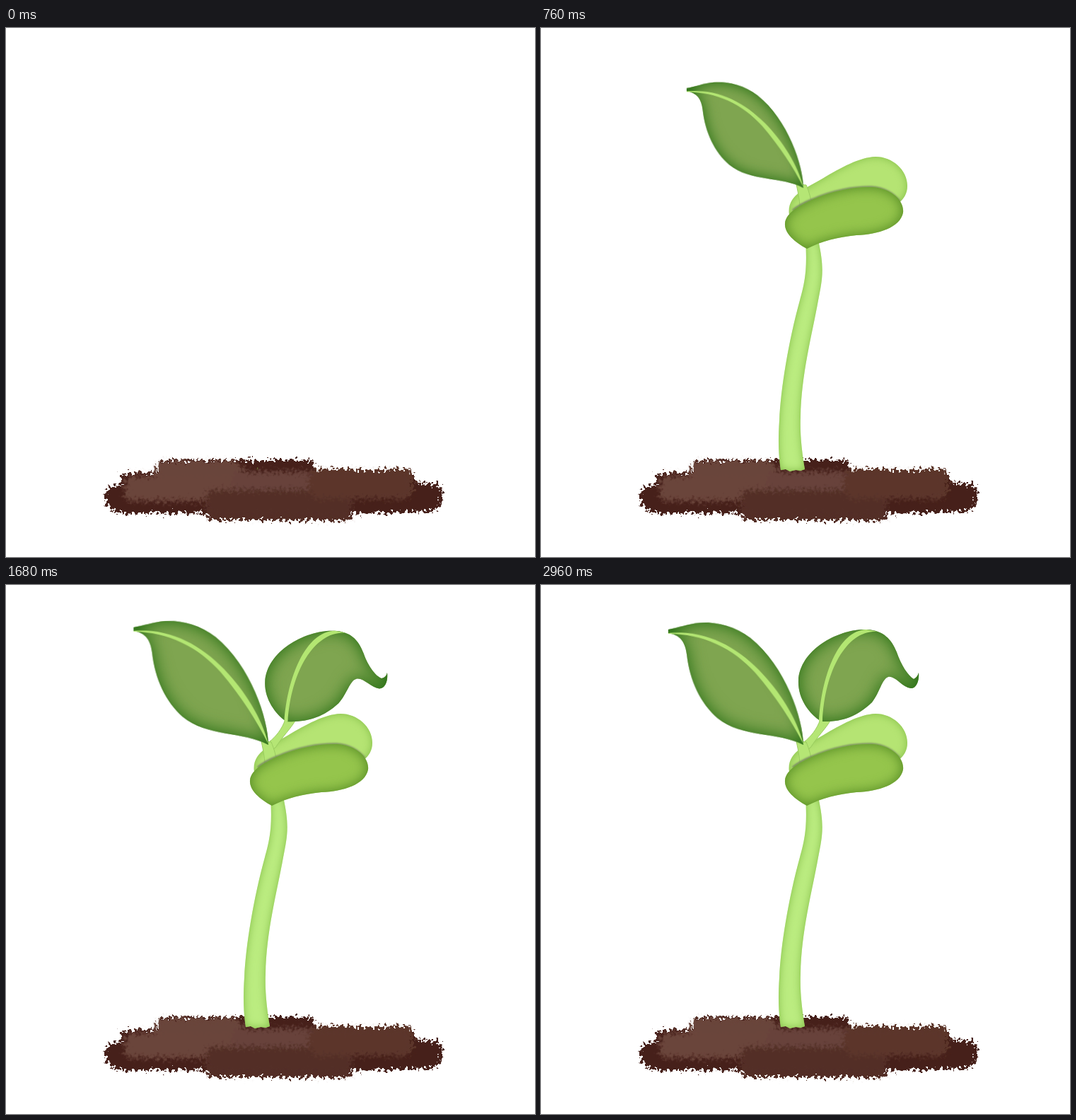
Write an HTML page without scripts that moves like this. It is 748 px wide and 748 px high and loops after 3 s.

```html
<!DOCTYPE html>
<html lang="en">
<head>
<meta charset="utf-8">
<title>Sprout</title>
<style>
html, body { margin: 0; width: 100%; height: 100%; overflow: hidden; background: #fff; }
svg { display: block; width: 100vw; height: 100vh; }

.pop { animation: 3s cubic-bezier(.333, 1.427, .667, 1) infinite; }
.sway { animation: 3s ease-in-out infinite; }

#plant { transform-origin: 355px 625px; animation-name: plant; }
#stalkL { transform-origin: 373px 252px; animation-name: stalkL; animation-timing-function: ease-out; }
#stalkR { transform-origin: 370px 238px; animation-name: stalkR; animation-timing-function: ease-out; }
#leafL { transform-origin: 371px 226px; animation-name: leafL; }
#leafR { transform-origin: 398px 193px; animation-name: leafR; }
#swayL { transform-origin: 371px 226px; animation-name: swayL; }
#bladeR { animation-name: bladeR; }
#veinR { animation-name: veinR; }

@keyframes plant { 0% { transform: scale(0); } 19.33%, 100% { transform: scale(1); } }
@keyframes stalkL { 0%, 18% { transform: scale(0); } 23.3%, 100% { transform: scale(1); } }
@keyframes stalkR { 0%, 25.3% { transform: scale(0); } 32%, 100% { transform: scale(1); } }
@keyframes leafL { 0%, 19.33% { transform: scale(0); } 38.67%, 100% { transform: scale(1); } }
@keyframes leafR { 0%, 32% { transform: scale(0); } 49.67%, 100% { transform: scale(1); } }

@keyframes swayL {
  0%, 32.33%, 63.33%, 94.33%, 100% { transform: rotate(-.4deg) skewY(-1.7deg); }
  47.83%, 78.83% { transform: rotate(0deg) skewY(0deg); }
}
@keyframes bladeR {
  0%, 32.33%, 63.33%, 94.33%, 100% {
    d: path("M396 193 C378 181 363 160 364 135 C366 91 422 61 461 63 C484 64 496 77 503 95 C509 113 519 128 527 133 C531 131 533 128 534 124 C535 133 532 146 523 146 C511 145 501 128 491 130 C482 133 479 152 468 166 C446 187 424 194 396 193Z");
  }
  47.83%, 78.83% {
    d: path("M397 193 C383 184 368 160 369 140 C371 95 428 66 468 67 C490 68 501 77 509 99 C515 116 527 130 536 131 C541 131 544 129 545 124 C547 137 542 147 534 147 C522 146 512 134 501 136 C491 138 488 153 473 169 C451 188 427 195 397 193Z");
  }
}
@keyframes veinR {
  0%, 32.33%, 63.33%, 94.33%, 100% { d: path("M393 193 C396 130 420 64 460 63 L477 66 C434 62 401 119 398 193Z"); }
  47.83%, 78.83% { d: path("M394 193 C400 132 428 67 472 67 L487 70 C442 66 406 121 399 193Z"); }
}
</style>
</head>
<body>
<svg viewBox="0 0 748 748">
  <defs>
    <!-- darker rim fading inwards -->
    <filter id="leafRim" x="-20%" y="-20%" width="140%" height="140%" color-interpolation-filters="sRGB">
      <feFlood flood-color="#37791f"/>
      <feComposite in2="SourceAlpha" operator="out"/>
      <feGaussianBlur stdDeviation="12"/>
      <feComponentTransfer><feFuncA type="linear" slope="1.35"/></feComponentTransfer>
      <feComposite in2="SourceAlpha" operator="in" result="rim"/>
      <feMerge><feMergeNode in="SourceGraphic"/><feMergeNode in="rim"/></feMerge>
    </filter>
    <filter id="seedRim" x="-20%" y="-30%" width="140%" height="160%" color-interpolation-filters="sRGB">
      <feFlood flood-color="#5f952a"/>
      <feComposite in2="SourceAlpha" operator="out"/>
      <feGaussianBlur stdDeviation="9"/>
      <feComponentTransfer><feFuncA type="linear" slope="1.35"/></feComponentTransfer>
      <feComposite in2="SourceAlpha" operator="in" result="rim"/>
      <feMerge><feMergeNode in="SourceGraphic"/><feMergeNode in="rim"/></feMerge>
    </filter>
    <filter id="paleRim" x="-30%" y="-20%" width="160%" height="140%" color-interpolation-filters="sRGB">
      <feFlood flood-color="#83bd48"/>
      <feComposite in2="SourceAlpha" operator="out"/>
      <feGaussianBlur stdDeviation="6"/>
      <feComposite in2="SourceAlpha" operator="in" result="rim"/>
      <feMerge><feMergeNode in="SourceGraphic"/><feMergeNode in="rim"/></feMerge>
    </filter>
    <filter id="soft" x="-10%" y="-40%" width="120%" height="180%"><feGaussianBlur stdDeviation="1.3"/></filter>
    <filter id="rough" filterUnits="userSpaceOnUse" x="110" y="590" width="530" height="125" color-interpolation-filters="sRGB">
      <feTurbulence type="fractalNoise" baseFrequency=".23" numOctaves="2" seed="8" result="grain"/>
      <feDisplacementMap in="SourceGraphic" in2="grain" scale="21" xChannelSelector="R" yChannelSelector="G"/>
    </filter>
    <filter id="blend" x="-10%" y="-20%" width="120%" height="140%"><feGaussianBlur stdDeviation="3"/></filter>
  </defs>

  <g filter="url(#rough)">
    <g fill="#46201a">
      <rect x="215" y="611" width="221" height="40" rx="7"/>
      <rect x="162" y="629" width="416" height="50" rx="7"/>
      <path d="M142 652 Q165 640 300 645 L600 643 Q618 646 617 660 Q616 680 602 683 L490 687 L160 686 Q132 676 142 652Z"/>
      <rect x="284" y="660" width="204" height="36" rx="7" fill="#532d25"/>
      <rect x="432" y="624" width="143" height="38" rx="8" fill="#5b3529"/>
      <rect x="213" y="613" width="115" height="40" rx="8" fill="#69443a"/>
    </g>
    <g filter="url(#blend)">
      <rect x="213" y="615" width="122" height="40" rx="10" fill="#69443a"/>
      <rect x="168" y="633" width="262" height="36" rx="10" fill="#6a443a"/>
      <rect x="320" y="627" width="115" height="30" rx="8" fill="#67433a"/>
      <rect x="428" y="628" width="144" height="38" rx="10" fill="#5c3529"/>
      <rect x="284" y="653" width="150" height="38" rx="8" fill="#532d25"/>
      <rect x="400" y="666" width="88" height="26" rx="8" fill="#532d25"/>
    </g>
  </g>

  <g id="plant" class="pop">
    <path fill="#bbec80" filter="url(#paleRim)" d="M374 300 C377 345 372 363 366 385 C350 443 339 510 337 555 C335 585 336 605 339 625 L346 624 L352 627 L360 625 L367 626 L373 624 C369 600 366 575 367 550 C368 490 383 435 392 385 C398 355 401 340 392 300Z"/>
    <path fill="#b5e473" filter="url(#paleRim)" d="M351 264 C347 236 376 226 398 213 C425 197 450 183 473 182 C497 182 518 201 518 223 C518 234 513 242 506 247 L440 270Z"/>
    <g id="stalkR" class="pop">
      <path fill="#b5e675" stroke="#9acb60" stroke-width="1" d="M395 190 L409 192 C402 204 391 214 381 230 L364 240 L372 222 C382 214 390 204 395 190Z"/>
    </g>
    <g id="stalkL" class="pop">
      <path fill="#b5e675" stroke="#9acb60" stroke-width="1" d="M361 221 C364 235 366 245 367 264 L384 260 C382 240 379 232 375 222Z"/>
    </g>
    <path fill="none" stroke="#77885f" stroke-width="3" filter="url(#soft)" d="M356 258 C364 251 375 246 385 242 C412 230 444 224 468 225 C485 226 499 234 507 245"/>
    <path fill="#95c54c" filter="url(#seedRim)" d="M376 312 C358 302 344 290 345 276 C347 260 368 250 385 242 C412 230 444 224 468 225 C492 226 514 242 512 261 C508 282 477 292 446 293 C418 296 398 301 376 312Z"/>
  </g>

  <g id="leafR" class="pop">
    <path id="bladeR" class="sway" fill="#7fa550" filter="url(#leafRim)" d="M396 193 C378 181 363 160 364 135 C366 91 422 61 461 63 C484 64 496 77 503 95 C509 113 519 128 527 133 C531 131 533 128 534 124 C535 133 532 146 523 146 C511 145 501 128 491 130 C482 133 479 152 468 166 C446 187 424 194 396 193Z"/>
    <path id="veinR" class="sway" fill="#b3e672" d="M393 193 C396 130 420 64 460 63 L477 66 C434 62 401 119 398 193Z"/>
  </g>

  <g id="leafL" class="pop">
    <g id="swayL" class="sway">
      <path fill="#7fa550" filter="url(#leafRim)" d="M371 226 C371 190 347 114 297 72 C275 54 248 47 226 48 C208 49 196 54 181 56 L181 61 C198 64 205 75 207 92 C211 130 226 162 250 184 C284 213 335 206 371 226Z"/>
      <path fill="#b3e672" d="M181 61 C232 58 275 82 309 118 C338 149 362 188 371 225 C355 192 333 157 304 122 C272 85 230 64 181 62Z"/>
    </g>
  </g>
</svg>
</body>
</html>
```
